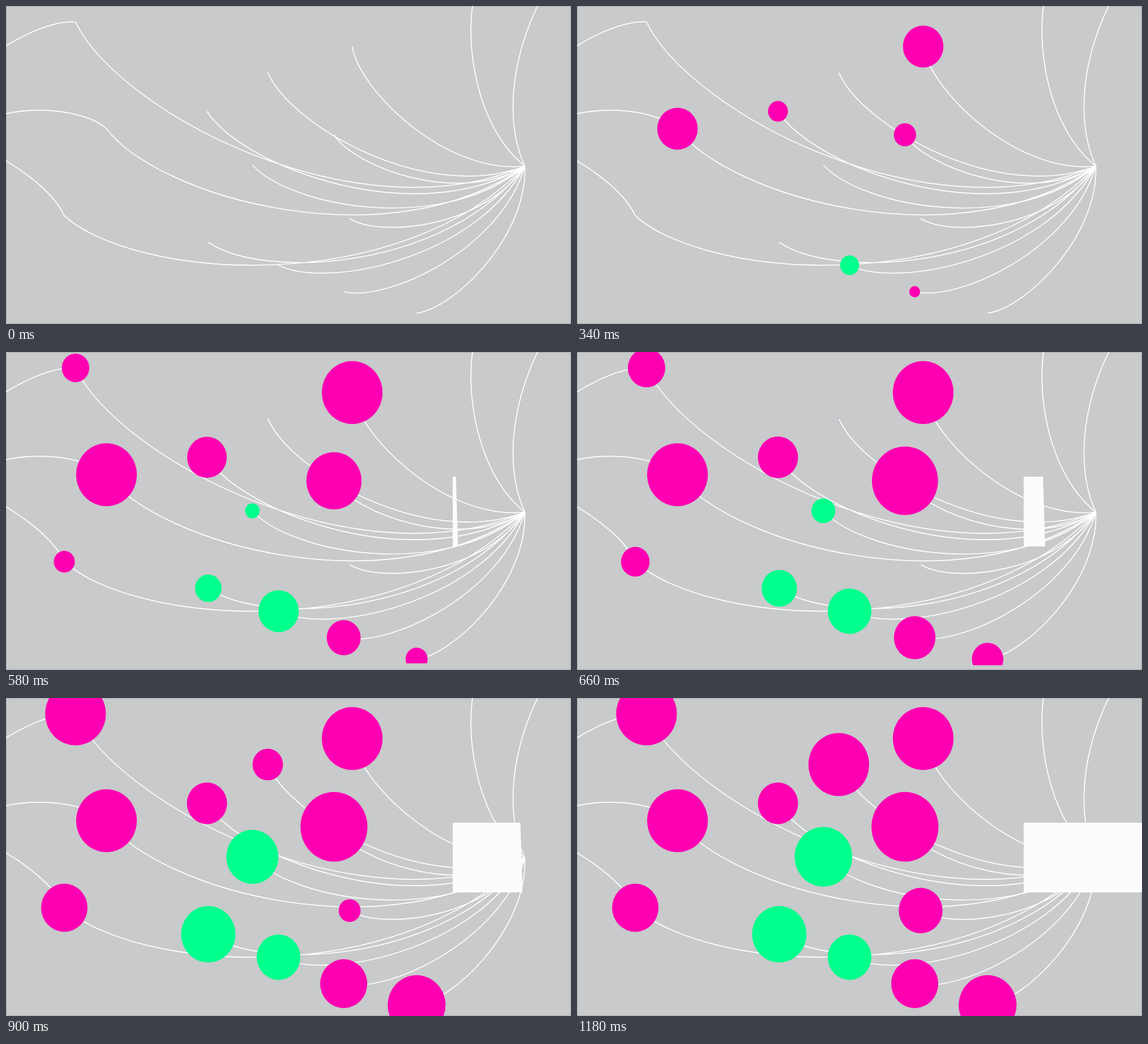
An HTML page with a canvas for the animation above (1.7 s loop, 998 px wide and 561 px high).

```html
<!DOCTYPE html>
<html lang="en">
<head>
<meta charset="utf-8">
<title>Branching dots</title>
<style>
  html, body { margin: 0; width: 100%; height: 100%; overflow: hidden; background: #c8cacb; }
  canvas { display: block; }
</style>
</head>
<body>
<canvas id="stage" width="998" height="561"></canvas>
<script>
const ctx = document.getElementById('stage').getContext('2d');
const W = 998, H = 561;
const LOOP = 1700, STEP = 20, GROW = 490;
const PINK = '#fd00b2', GREEN = '#00ff8d';
const ASPECT = 1.037; // the whole drawing is slightly taller than wide
const HUB = { x: 916.5, y: 282.5 };

const dot = (x, y, radius, start, extra) => ({ x, y, radius, start, color: PINK, ...extra });
const green = { color: GREEN };
const tailTo = (x, y) => ({ tail: { x, y } });

// Each dot hangs on a strand from the hub; some also have a tail to a point off stage
const dots = [
  dot(611.5, 71.5, 53.6, 13),
  dot(177.5, 216.5, 53.6, 13, tailTo(-91, 236)),
  dot(355, 185.8, 35.5, 97),
  dot(481.5, 457.3, 38.6, 127, green),
  dot(579.3, 227.2, 59.2, 177),
  dot(596.5, 504, 41.6, 227),
  dot(357.3, 416.8, 48, 341, green),
  dot(122.8, 28, 53.6, 358, tailTo(-192, 332)),
  dot(103, 370, 41, 358, tailTo(-325, 226)),
  dot(725.3, 541.8, 51, 393, { flat: 0.37 }),
  dot(435.2, 280.2, 50.8, 457, green),
  dot(462.4, 117.4, 53.6, 654),
  dot(607, 375, 38.7, 655)
];
const offstage = [{ x: 841.4, y: -55 }, { x: 1004, y: -82 }];

// Every line is the same bowed curve, turned and scaled to join two points
function bow(from, to) {
  const dx = to.x - from.x, dy = (to.y - from.y) / ASPECT;
  const at = (along, across) => [
    from.x + along * dx - across * dy,
    from.y + (along * dy + across * dx) * ASPECT
  ];
  ctx.moveTo(from.x, from.y);
  ctx.bezierCurveTo(...at(0.139, 0.148), ...at(0.7, 0.247), to.x, to.y);
}

function drawLines() {
  ctx.strokeStyle = '#fff';
  ctx.lineWidth = 1.7;
  ctx.beginPath();
  for (const p of [...dots, ...offstage]) {
    bow(p, HUB);
    if (p.tail) bow(p, p.tail);
  }
  ctx.stroke();
}

function drawDot(t, { x, y, radius, start, color, flat = 1 }) {
  const r = radius * Math.min(1, Math.max(0, (t - start) / GROW));
  if (!r) return;
  const cut = Math.asin(flat); // a flat dot is cut off below its centre
  ctx.fillStyle = color;
  ctx.beginPath();
  ctx.ellipse(x, y, r, r * ASPECT, 0, Math.PI - cut, 2 * Math.PI + cut);
  ctx.fill();
}

// Panel wiped in from the left behind a slightly slanted edge
function drawPanel(t) {
  const left = 789, top = 220, bottom = 343, slant = 3.7;
  const width = (t - 564) * 0.356;
  if (width <= 0) return;
  ctx.fillStyle = '#fcfcfc';
  ctx.beginPath();
  ctx.moveTo(left, top);
  ctx.lineTo(left + width, top);
  ctx.lineTo(left + width + slant, bottom);
  ctx.lineTo(left, bottom);
  ctx.fill();
}

function draw(t) {
  ctx.fillStyle = '#c8cacb';
  ctx.fillRect(0, 0, W, H);
  ctx.strokeStyle = '#a6a8a9';
  ctx.lineWidth = 1;
  ctx.strokeRect(0.5, 0.5, W - 1, H - 1);
  drawLines();
  dots.forEach(d => drawDot(t, d));
  drawPanel(t);
}

const origin = performance.now();
function tick() {
  const t = (performance.now() - origin) % LOOP;
  draw(Math.floor(t / STEP) * STEP);
  requestAnimationFrame(tick);
}
tick();
</script>
</body>
</html>
```
